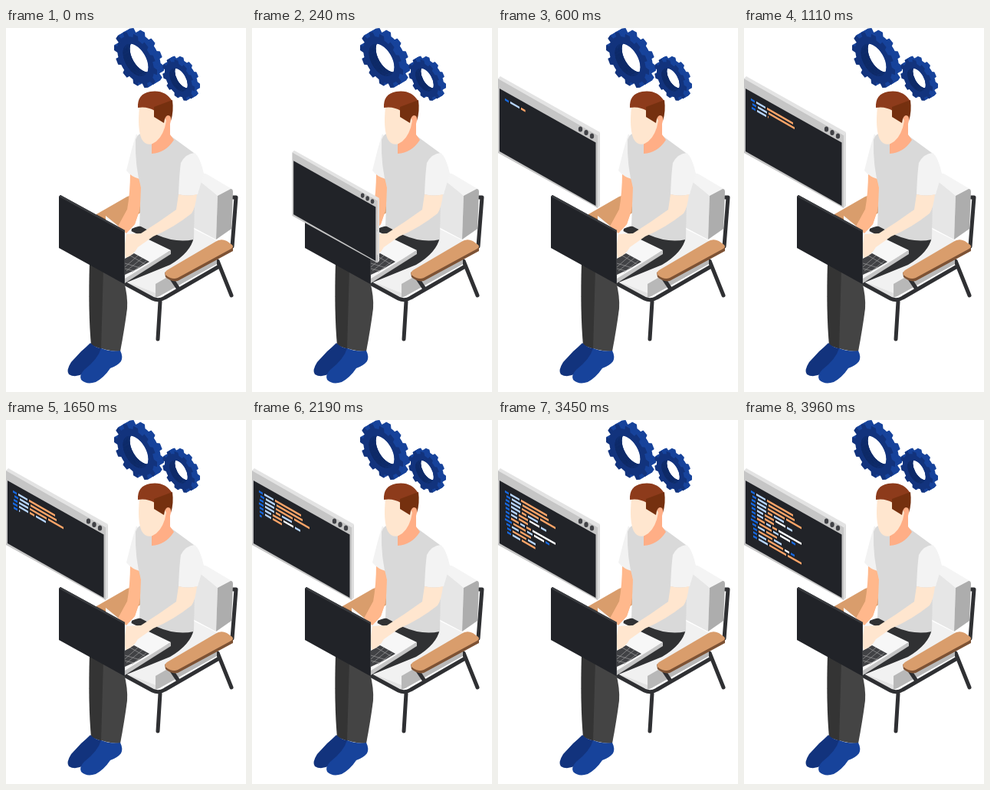
An HTML page for the animation above (7550 ms loop, 313 by 475 pixels).

```html
<!DOCTYPE html>
<html lang="en">
<head>
<meta charset="utf-8">
<style>
html, body { margin: 0; width: 100%; height: 100%; overflow: hidden; background: #fff; }
svg { display: block; width: 100%; height: 100%; }
.line { fill: none; stroke: #2f3033; stroke-width: 5; stroke-linecap: round; stroke-linejoin: round; }
</style>
</head>
<body>
<svg viewBox="0 0 313 475" preserveAspectRatio="xMidYMid meet">
  <g id="gears"></g>

  <g id="chair">
    <path class="line" d="M296 221H300L295 285M276 304L294 349"/>
    <path fill="#d99d6c" d="M118 243L158 220Q166 216 174 222L177 240L146 260Z"/>
    <path fill="#8a5c3b" d="M118 243L146 258V262L118 246Z"/>
    <path fill="#e6e6e6" d="M244 202L252 195L276 219L274 276L240 258Z"/>
    <path fill="#f4f4f4" d="M249 197L256 190Q260 189 264 192L296 211L276 219Z"/>
    <path fill="#adadad" d="M276 219L293 210Q296 210 296 214L294 262L274 276Z"/>
    <path fill="#f1f1f1" d="M155 330L214 292L244 262L290 285L207 333L196 350Z"/>
    <path fill="#e2e2e2" d="M155 330L195 346V354L155 336Z"/>
    <path fill="#b8b8b8" d="M195 334L275 288V308L200 350L195 352Z"/>
    <path class="line" d="M156 334L191 353Q199 357 207 352L278 311M201 357L198 406M216 327L224 339"/>
  </g>

  <g id="legs">
    <path fill="#303133" d="M164 262Q180 254 200 262L245 273Q241 293 214 309L155 333V310Z"/>
    <path fill="#343434" d="M109 306L129 316L125 419L111 414Q107 370 109 306Z"/>
    <path fill="#444" d="M127 314L154 331Q159 350 158 366Q155 390 149 422Q136 422 124 418Z"/>
    <path fill="#12337d" d="M110 411Q105 416 98 422L85 436Q78 447 82 452Q90 457 101 451L124 432V418Q116 417 110 411Z"/>
    <path fill="#17439b" d="M124 418Q137 423 149 421Q153 429 150 435Q145 441 136 444Q128 456 117 462Q105 466 98 459Q95 453 102 446Q120 432 124 418Z"/>
  </g>

  <g id="body">
    <path fill="#ffb88c" d="M162 188L174 194Q179 217 174 238L168 256L157 268L146 259L158 237Q162 215 162 188Z"/>
    <path fill="#f2f2f2" d="M170 138L164 158L157 186Q163 194 174 197L180 150Z"/>
    <path fill="#d9d9d9" d="M169 146Q172 136 181 137L190 152L215 141L245 163Q250 170 246 220L245 276Q222 281 197 270L174 258L176 208Q168 180 169 146Z"/>
    <path fill="#ffae86" d="M190 140L208 116Q212 111 216 117L214 125V139L219 146Q208 163 190 164Z"/>
    <path fill="#f3f3f3" d="M246 163Q253 168 258 190L250 217Q238 220 225 217Q226 190 228 176Q234 164 246 163Z"/>
    <path fill="#ffe6cf" d="M174 103Q171 132 177 145Q182 154 191 151Q202 146 207 130L209 121L200 100Z"/>
    <path fill="#8d3b1b" d="M172 104Q171 86 188 83Q208 80 217 96L194 108Q184 102 172 104Z"/>
    <path fill="#75300f" d="M193 103L217 94Q219 109 215 121Q216 114 211 114Q207 115 206 124L193 116Z"/>
  </g>

  <g id="laptop">
    <path fill="#c5c5c5" d="M153 326L215 290V295L155 333Z"/>
    <path fill="#f7f7f7" d="M146 258L157 262L215 290L155 327V266L130 252V245Z"/>
    <path fill="#414245" d="M167 294L187 305L170 315L155 322V301Z"/>
    <path stroke="#aaa" stroke-width=".6" fill="none" d="M155 307L175 313M155 314L167 317M162 297L181 308M157 317L178 300M155 312L172 297M164 319L183 304"/>
    <path fill="#ffb88c" d="M158 237L174 238L168 256L157 268L146 259Z"/>
    <path fill="#ffe6cf" d="M225 217Q238 220 249 217Q247 235 242 242Q218 261 192 272L172 286Q166 297 156 300L154 288L157 269L176 268Q200 253 222 237Z"/>
    <path fill="#212328" d="M69 220L71 218L155 264V333L154 334L69 287Z"/>
    <path fill="#393b3f" d="M71 218L155 264V333H154V266L69 220Z"/>
  </g>

  <g id="armrest">
    <path fill="#7d5234" d="M207 319L296 285V291L224 330Q216 332 208 325Z"/>
    <path fill="#d99d6c" d="M210 316L273 279Q280 274 288 278L295 283Q298 286 292 289L224 326Q217 329 209 323Q205 320 210 316Z"/>
  </g>

  <g id="panel">
    <path fill="#e3e3e3" d="M0 66L3 63L133 136L130 140Z"/>
    <path fill="#dedede" d="M130 140L133 136V232L130 235Z"/>
    <path fill="#c6c6c6" d="M0 66L130 140V235L0 163Z"/>
    <path fill="#212328" d="M2 79L127.5 149.5V232L2 161Z"/>
    <g fill="#414246">
      <ellipse cx="107.5" cy="132" rx="2.7" ry="3.6"/>
      <ellipse cx="115" cy="136.5" rx="2.7" ry="3.6"/>
      <ellipse cx="122.5" cy="141" rx="2.7" ry="3.6"/>
    </g>
    <g id="code" transform="matrix(1 .57 0 1 0 0)"></g>
  </g>
</svg>
<script>
const $ = id => document.getElementById(id);
const add = (parent, tag, attrs) => {
  const el = document.createElementNS('http://www.w3.org/2000/svg', tag);
  for (const key in attrs) el.setAttribute(key, attrs[key]);
  return parent.appendChild(el);
};

// Cog outline in the left isometric plane, with a round hole
function cogPath(outer, hole, teeth) {
  const pt = (r, a) => `${r * Math.cos(a)} ${r * Math.sin(a)}`;
  const step = 2 * Math.PI / teeth, pts = [];
  for (let i = 0; i < teeth; i++) {
    for (const [r, f] of [[.85, -.5], [.85, -.28], [1, -.2], [1, .2], [.85, .28]])
      pts.push(pt(outer * r, (i + f) * step));
  }
  return `M${pts.join('L')}ZM${hole} 0A${hole} ${hole} 0 1 0 ${-hole} 0A${hole} ${hole} 0 1 0 ${hole} 0Z`;
}
// Stacked layers give the depth; a dark ring on each one shades the hole's wall
function cog(x, y, outer, hole, teeth, depth) {
  const d = cogPath(outer, hole, teeth);
  for (let z = depth; z >= 0; z -= .5) {
    const layer = add($('gears'), 'g', { transform: `matrix(.866 .5 0 1 ${x + z} ${y - z * .58})` });
    add(layer, 'path', { d, fill: z ? '#17439b' : '#12337d', 'fill-rule': 'evenodd' });
    if (z) add(layer, 'circle', { r: hole + 1, fill: 'none', stroke: '#0c2358', 'stroke-width': 2 });
  }
}
cog(169, 41.7, 32.5, 19, 12, 9);
cog(225, 67.5, 24.4, 13.5, 11, 7);

// Each row: start time, left edge, then colour and length of its dashes
const colors = { B: '#1768df', L: '#b8d6ff', O: '#ffa568', W: '#fff' };
const rows = `470 9 B5 L12 O34
740 11 B5 L12 O34
1010 10 B5 L12 O22 O20
1310 9 B6 L12 O6 L13
1600 10 B5 L8 O12 W13 L7
1930 10 B5 L8 O12
2180 10 B5 O10 L6 O6 W30
2440 9 B9 O16 L7 W13 B5
2730 11 B5 L9 O14
2950 12 B5 O18 L10
3220 12 B5 L10 O20 W6 B5
3560 12 B5 L12 O22 O18`.split('\n').map(row => row.split(' '));
const dashes = [];
rows.forEach(([start, left, ...parts], i) => {
  const first = +left;
  let x = first;
  const line = parts.map(part => {
    const w = +part.slice(1);
    const el = add($('code'), 'rect', { x, y: 86.7 + 5.15 * i, height: 2.7, fill: colors[part[0]] });
    const dash = { el, x, w, first, start: +start, end: rows[i + 1] ? +rows[i + 1][0] : 3960 };
    x += w + 2;
    return dash;
  });
  line.forEach(dash => dash.length = x - 2 - first);
  dashes.push(...line);
});

const clamp = (v, a, b) => Math.min(b, Math.max(a, v));

function draw(t) {
  const k = clamp((540 - t) / 210, 0, 2);
  const scale = t < 270 ? Math.max(0, (t - 120) / 150 * 1.058) : 1 + .045 * k;
  $('panel').setAttribute('visibility', scale ? 'visible' : 'hidden');
  $('panel').setAttribute('transform',
    `translate(${66.5 + 30 * k} ${149.5 + 59 * k}) scale(${scale}) translate(-66.5 -149.5)`);
  for (const d of dashes) {
    const head = d.first + d.length * clamp((t - d.start) / (d.end - d.start), 0, 1);
    d.el.setAttribute('width', clamp(head - d.x, 0, d.w));
  }
}

const begin = performance.now();
function tick() {
  draw((performance.now() - begin) % 7550);
  requestAnimationFrame(tick);
}
tick();
</script>
</body>
</html>
```
